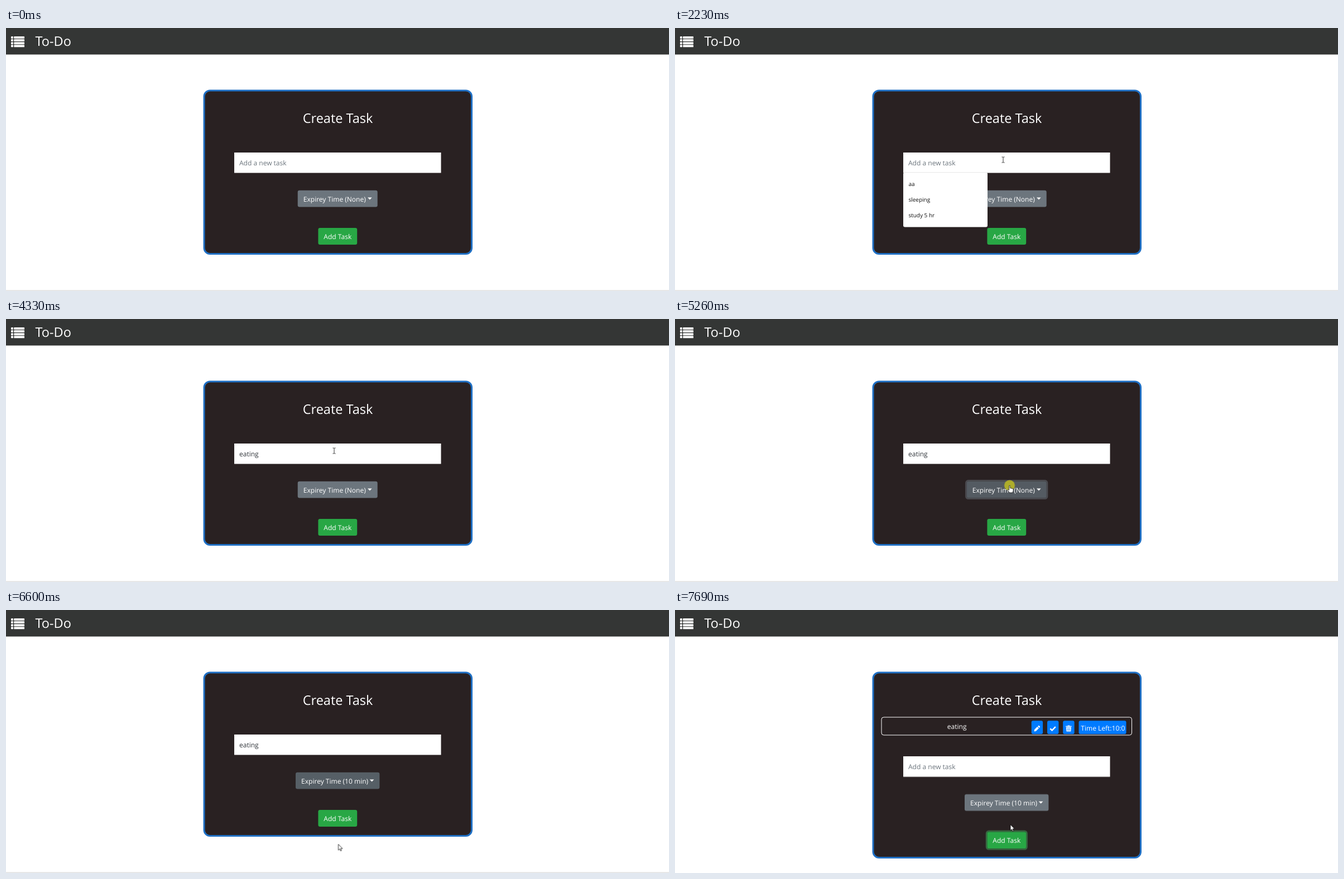
Write an HTML page that moves like this. It is 1188 px wide and 471 px high and loops after 8 s.

```html
<!DOCTYPE html>
<html lang="en">
<head>
<meta charset="utf-8">
<title>To-Do</title>
<style>
html, body { margin: 0; width: 100%; height: 100%; overflow: hidden; background: #fff; }
svg { display: block; font: 12.03px "Open Sans", "Noto Sans", sans-serif; text-rendering: geometricPrecision; }

/* Every animated part shares one 8 s timeline of hard steps. */
svg * { animation: 8s step-end infinite; }
.title { font-size: 23.5px; }
.light { fill: #fff; }
.hint { font-size: 10px; fill: #111; }
.item { fill: #212529; }
.ring { fill: none; stroke-width: 2.6; }

#card { height: 292.5px; animation-name: card; }
#form { animation-name: form; }
#task { opacity: 0; animation-name: task; }
#placeholder { animation-name: placeholder; }
#typed { width: 0; animation-name: typed; }
#caret { opacity: 0; animation-name: caret; }
#hints { opacity: 0; animation-name: hints; }
#expiry { x: 522.7px; width: 143px; fill: #6c757d; animation-name: expiry; }
#expiryRing { opacity: 0; animation-name: expiryRing; }
#before { animation-name: before; }
#after { opacity: 0; animation-name: after; }
#menu { opacity: 0; animation-name: menu; }
#hover { fill: #fff; animation-name: hover; }
#choice { animation-name: choice; }
#add { fill: #28a745; animation-name: add; }
#addRing { opacity: 0; animation-name: addRing; }
#pointer { animation-name: pointer; }
#click { opacity: 0; animation-name: click; }
#arrow { opacity: 0; animation-name: arrow; }
#beam { opacity: 0; animation-name: beam; }
#hand { opacity: 0; animation-name: hand; }

@keyframes card { 95.25% { height: 331.5px; } }
@keyframes form { 95.25% { transform: translateY(39.2px); } }
@keyframes task { 95.25% { opacity: 1; } }
@keyframes placeholder { 30.75% { opacity: 0; } 95.25% { opacity: 1; } }
@keyframes typed {
  30.75% { width: 6.5px; } 31.75% { width: 13.2px; } 36.5% { width: 17.6px; }
  40.5% { width: 20.6px; } 44.375% { width: 28px; } 47.25% { width: 40px; }
  95.25% { width: 0; }
}
@keyframes caret {
  21.125% { opacity: 1; }
  27.875% { opacity: 0; }
  30.75% { opacity: 1; transform: translateX(6px); }
  31.75% { opacity: 1; transform: translateX(13px); }
  36.5% { opacity: 1; transform: translateX(17px); }
  40.5% { opacity: 1; transform: translateX(20px); }
  44.375% { opacity: 1; transform: translateX(27px); }
  47.25% { opacity: 1; transform: translateX(34px); }
  54.125% { opacity: 0; transform: translateX(34px); }
  60.75% { opacity: 1; transform: translateX(34px); }
  64.75% { opacity: 0; }
}
@keyframes hints { 22.25% { opacity: 1; } 31.75% { opacity: 0; } }
@keyframes expiry {
  60.75% { fill: #636c73; x: 522.7px; width: 143px; }
  61.75% { fill: #5a6268; x: 522.7px; width: 143px; }
  63.75% { fill: #545b62; x: 522.7px; width: 143px; }
  82.5% { fill: #565f66; x: 519px; width: 150.4px; }
  83.375% { fill: #6c757d; x: 519px; width: 150.4px; }
}
@keyframes expiryRing { 64.75% { opacity: .6; } 65.75% { opacity: 1; } 79.625% { opacity: .5; } 80.5% { opacity: 0; } }
@keyframes before { 82.5% { opacity: 0; } }
@keyframes after { 82.5% { opacity: 1; } }
@keyframes menu { 66.75% { opacity: 1; } 82.5% { opacity: 0; } }
@keyframes hover {
  70.75% { fill: #f8f9fa; }
  71.75% { fill: #f8f9fa; transform: translateY(25.6px); }
  72.75% { fill: #f8f9fa; transform: translateY(51.2px); }
  73.625% { fill: #f8f9fa; transform: translateY(76.8px); }
  79.625% { fill: #007bff; transform: translateY(76.8px); }
}
@keyframes choice { 79.625% { fill: #fff; } }
@keyframes add {
  86.375% { fill: #24963e; } 87.25% { fill: #218838; } 91.25% { fill: #1e7e34; }
  93.25% { fill: #208537; } 95.25% { fill: #24963e; } 96.125% { fill: #28a745; }
}
@keyframes addRing { 92.25% { opacity: .6; } 93.25% { opacity: 1; } }
@keyframes pointer {
  6.625% { transform: translate(701px, 404px); }
  7.625% { transform: translate(692px, 352px); }
  8.625% { transform: translate(676px, 297px); }
  9.5% { transform: translate(646px, 250px); }
  10.5% { transform: translate(614px, 221px); }
  11.5% { transform: translate(592px, 208px); }
  12.5% { transform: translate(584px, 203px); }
  15.375% { transform: translate(584px, 208px); }
  16.375% { transform: translate(585px, 218px); }
  17.25% { transform: translate(587px, 230px); }
  18.25% { transform: translate(587px, 235px); }
  55% { transform: translate(587px, 237px); }
  56% { transform: translate(588px, 242px); }
  57% { transform: translate(590px, 250px); }
  57.875% { transform: translate(592px, 261px); }
  58.875% { transform: translate(595px, 274px); }
  59.875% { transform: translate(598px, 287px); }
  60.75% { transform: translate(599px, 294px); }
  61.75% { transform: translate(599.5px, 298px); }
  69.75% { transform: translate(600px, 306px); }
  70.75% { transform: translate(601px, 332px); }
  71.75% { transform: translate(600px, 360px); }
  72.75% { transform: translate(599px, 388px); }
  73.625% { transform: translate(597px, 407px); }
  74.625% { transform: translate(596px, 416px); }
  75.625% { transform: translate(595.5px, 419.5px); }
  85.5% { transform: translate(597px, 411px); }
  86.375% { transform: translate(600px, 387px); }
  87.25% { transform: translate(601px, 384.3px); }
}
@keyframes click {
  21.125% { opacity: 1; } 24% { opacity: 0; }
  63.75% { opacity: 1; } 66.75% { opacity: 0; }
  79.625% { opacity: 1; } 82.5% { opacity: 0; }
  91.25% { opacity: 1; } 93.25% { opacity: 0; }
}
@keyframes arrow {
  6.625% { opacity: 1; } 9.5% { opacity: 0; } 10.5% { opacity: 1; } 17.25% { opacity: 0; }
  57.875% { opacity: 1; } 60.75% { opacity: 0; } 82.5% { opacity: 1; } 86.375% { opacity: 0; }
  94.125% { opacity: 1; }
}
@keyframes beam { 9.5% { opacity: 1; } 10.5% { opacity: 0; } 17.25% { opacity: 1; } 57.875% { opacity: 0; } }
@keyframes hand { 60.75% { opacity: 1; } 82.5% { opacity: 0; } 86.375% { opacity: 1; } 94.125% { opacity: 0; } }
</style>
</head>
<body>
<svg width="1188" height="471" viewBox="0 0 1188 471">
  <defs>
    <clipPath id="typedArea"><rect id="typed" x="418" y="228" height="28"/></clipPath>
    <g id="listRow">
      <rect width="4" height="4" rx="1"/>
      <rect x="5.3" width="18.7" height="4" rx=".6"/>
    </g>
    <path id="toggle" d="M0 0h7.7l-3.85 3.85z"/>
  </defs>

  <rect width="1188" height="47.5" fill="#343635"/>
  <g class="light">
    <use href="#listRow" x="9" y="15"/>
    <use href="#listRow" x="9" y="20.1"/>
    <use href="#listRow" x="9" y="25.2"/>
    <use href="#listRow" x="9" y="30.3"/>
    <text class="title" x="52.5" y="32">To-Do</text>
  </g>

  <rect id="card" x="355" y="112" width="479.5" rx="10.5" fill="#292122" stroke="#1f70c5" stroke-width="3"/>
  <text class="title light" x="594.5" y="170" text-anchor="middle">Create Task</text>

  <g id="task">
    <rect x="370" y="192" width="448.5" height="32" rx="4" fill="none" stroke="#fff"/>
    <text class="light" x="487.8" y="213">eating</text>
    <g fill="#007bff">
      <rect x="638.7" y="198.3" width="20.4" height="24" rx="3"/>
      <rect x="667" y="198.3" width="20.4" height="24" rx="3"/>
      <rect x="695.2" y="198.3" width="20.4" height="24" rx="3"/>
      <rect x="723.5" y="198.3" width="85" height="24" rx="3"/>
    </g>
    <g class="light">
      <path d="M643.5 217.5l.5-3.3 5.2-5.2 2.8 2.8-5.2 5.2zM650 208.2l1-1q.8-.6 1.6.1l1.2 1.2q.6.8 0 1.5l-1 1z"/>
      <path d="M672.3 212.3l3.3 3.3 6.2-6.4" fill="none" stroke="#fff" stroke-width="2.4"/>
      <path d="M700.2 207.8h3l.8-1h2.8l.8 1h3v1.4h-10.4zM701 210h8.8l-.5 7.5h-7.8z"/>
      <path d="M703.4 211.2v5M705.4 211.2v5M707.4 211.2v5" stroke="#007bff" stroke-width=".8"/>
      <text x="727.3" y="215.5">Time Left:10:0</text>
    </g>
  </g>

  <g id="form">
    <rect y="469.4" width="1188" height="1.6" fill="#e2e2e2"/>
    <rect x="409" y="223" width="370.5" height="36.5" fill="#fff"/>
    <text id="placeholder" x="418" y="246.2" fill="#6c757d">Add a new task</text>
    <text x="418" y="246.2" fill="#30353a" clip-path="url(#typedArea)">eating</text>
    <rect id="caret" x="418" y="232" width="1" height="18" fill="#222"/>

    <rect id="expiryRing" class="ring" x="521.4" y="289.4" width="145.6" height="32.4" rx="4" stroke="#4b4b50"/>
    <rect id="expiry" y="290.7" height="29.8" rx="3.2"/>
    <g id="before" class="light">
      <text x="532.8" y="310.8">Expirey Time (None)</text>
      <use href="#toggle" x="648" y="303.6"/>
    </g>
    <g id="after" class="light">
      <text x="529.1" y="310.8">Expirey Time (10 min)</text>
      <use href="#toggle" x="651.7" y="303.6"/>
    </g>

    <rect id="addRing" class="ring" x="558.1" y="356.7" width="72.4" height="32.6" rx="4" stroke="#386b42"/>
    <rect id="add" x="559.4" y="358" width="69.8" height="30" rx="3.2"/>
    <text class="light" x="594.3" y="378.2" text-anchor="middle">Add Task</text>
  </g>

  <g id="hints">
    <rect x="409" y="258.5" width="151" height="98" rx="3" fill="#fff"/>
    <path d="M410 258.7h149" stroke="#ddd" stroke-width=".8"/>
    <text class="hint" x="418.4" y="282.6">aa</text>
    <text class="hint" x="418.4" y="310.9">sleeping</text>
    <text class="hint" x="418.4" y="339.2">study 5 hr</text>
  </g>

  <g id="menu">
    <rect x="523" y="320.4" width="127.2" height="141.6" rx="3.2" fill="#fff" stroke="#bbb" stroke-width=".8"/>
    <rect id="hover" x="523.4" y="327.2" width="126.4" height="25.6"/>
    <text class="item" x="543" y="344.4">None</text>
    <text class="item" x="543" y="370">1 min</text>
    <text class="item" x="543" y="395.6">5 min</text>
    <text id="choice" class="item" x="543" y="421.2">10 min</text>
    <text class="item" x="543" y="446.8">30 min</text>
  </g>

  <g id="pointer">
    <circle id="click" r="9.5" fill="#c8c41e" fill-opacity=".78"/>
    <path id="arrow" d="M0 0v10.6l2.4-2.2 1.6 3.6 1.7-.7-1.6-3.5h3.4z" fill="#fff" stroke="#000" stroke-width=".8"/>
    <path id="beam" d="M-1.5-4h2l.5.5.5-.5h2M-1.5 6h2l.5-.5.5.5h2M1-3.5v9" fill="none" stroke="#333"/>
    <path id="hand" d="M-.9.7Q0-.6 1 .7v4.1l4 .8q1.6.4 1.6 2v1.9L5.4 13H-.2l-3-4.4q-.2-1.6 1.3-1.2l1 1z" fill="#fff" stroke="#000" stroke-width=".7"/>
  </g>
</svg>
</body>
</html>
```
